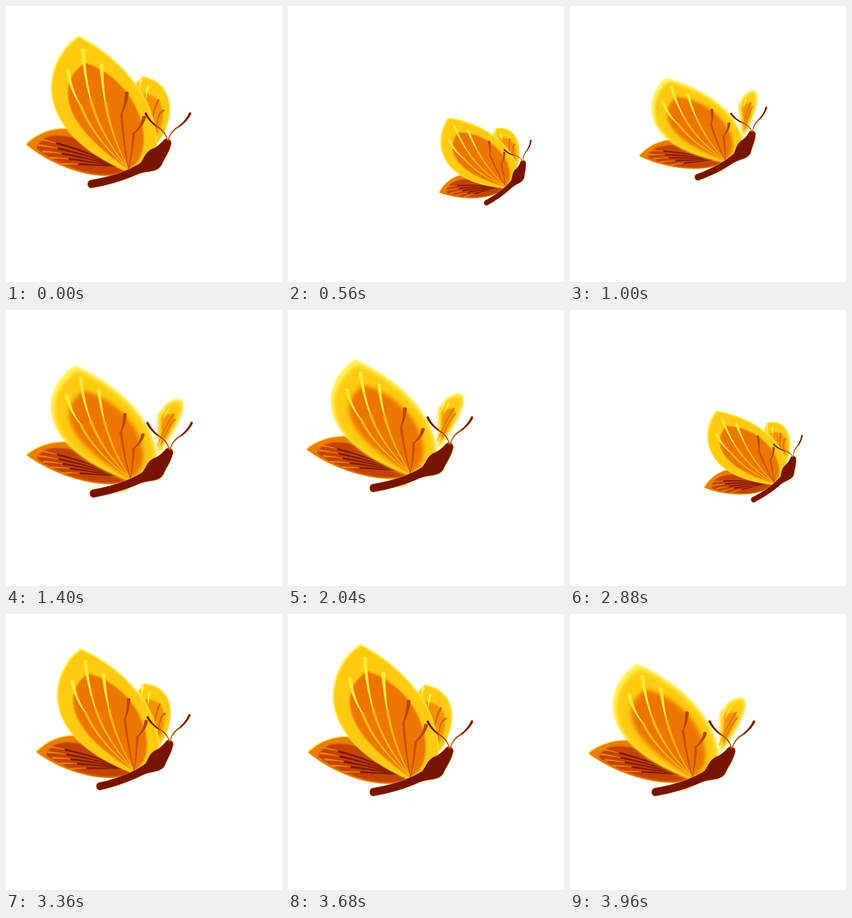
These frames come from a looping animation (480x480 px, 4000 ms). An HTML page with a canvas:

```html
<!DOCTYPE html>
<html lang="en">
<head>
<meta charset="utf-8">
<title>Butterfly</title>
<style>
html, body { margin: 0; width: 100%; height: 100%; overflow: hidden; background: #fff; }
canvas { display: block; width: 100vw; height: 100vh; }
</style>
</head>
<body>
<canvas id="stage" width="480" height="480"></canvas>
<script>
const ctx = document.getElementById('stage').getContext('2d');
const LOOP = 4000, STEP = 40;
const ROOT = [213, 285], FAR_ROOT = [262, 238];
const YELLOW = '#ffca10', PALE = '#fff45c', ORANGE = '#ed7600', BROWN = '#761400';

const WING = new Path2D('M126 51C72 85 25 205 210 288C240 275 262 258 262 238C262 165 205 92 126 51Z');
const WING_IN = new Path2D('M138 99C95 125 80 195 213 284C268 255 235 130 138 99Z');
const LOWER = new Path2D('M34 240C75 200 150 195 213 285C180 310 90 288 34 240Z');
const LOWER_IN = new Path2D('M53 248C62 212 130 215 213 285C165 308 90 278 53 248Z');
const FAR = new Path2D('M262 240C300 190 290 130 237 122L225 135Z');
const FAR_IN = new Path2D('M262 226C280 195 278 155 238 152Z');
const BODY = new Path2D(
  'M147 303C185 297 215 285 234 273C242 262 243 252 258 247C267 242 270 238 273 235' +
  'A7.5 7.5 0 0 1 286.5 242C282 258 275 265 270 277C262 290 245 286 230 292' +
  'C205 303 180 311 148 316.5A7 7 0 0 1 147 303Z');

const lerp = (a, b, k) => a + (b - a) * k;
const sin2 = a => Math.sin(a) ** 2;

// Out along a wide arc, back along a higher and slower one.
function flight(t) {
  const OUT = 580, BACK = 866;
  const rest = { x: 0, y: 0, scale: 1, deg: 0 };
  if (t < 0 || t > OUT + BACK) return rest;
  const away = t < OUT;
  const angle = Math.PI * (away ? t / OUT : 1 + (t - OUT) / BACK);
  const reach = sin2(angle / 2), side = sin2(angle);
  return {
    x: 166 * reach - side * (away ? 12 : 30),
    y: 29 * reach + side * (away ? 54 : -31),
    scale: 1 - .37 * reach,
    deg: -19 * reach + side * (away ? 2.8 : 0)
  };
}

function poseAt(t) {
  const pose = flight(t < 2000 ? t : t - 2135);
  const k = (t - 1300) / 500;
  const dip = k > 0 && k < 1 ? sin2(Math.PI * k) : 0;
  pose.x += 9 * dip;
  pose.y += 29 * dip;
  return pose;
}

// Curved stroke that thins from w0 to w1.
function taper(color, w0, w1, x0, y0, cx, cy, x1, y1) {
  const left = [], right = [];
  for (let i = 0; i <= 14; i++) {
    const k = i / 14, m = 1 - k;
    const x = m * m * x0 + 2 * m * k * cx + k * k * x1;
    const y = m * m * y0 + 2 * m * k * cy + k * k * y1;
    const dx = m * (cx - x0) + k * (x1 - cx), dy = m * (cy - y0) + k * (y1 - cy);
    const w = lerp(w0, w1, k) / 2 / Math.hypot(dx, dy);
    left.push([x - dy * w, y + dx * w]);
    right.unshift([x + dy * w, y - dx * w]);
  }
  ctx.fillStyle = color;
  ctx.beginPath();
  left.concat(right).forEach(p => ctx.lineTo(...p));
  ctx.fill();
  ctx.beginPath();
  ctx.arc(x0, y0, w0 / 2, 0, 7);
  ctx.fill();
}

function blur(size) {
  ctx.filter = size ? `blur(${size}px)` : 'none';
}

function fill(path, color, size = 0) {
  blur(size);
  ctx.fillStyle = color;
  ctx.fill(path);
  blur(0);
}

// Linear map about a root, blended from folded to open.
function fold([x, y], open, a, b, c, d, draw) {
  ctx.save();
  ctx.translate(x, y);
  ctx.transform(lerp(a, 1, open), lerp(c, 0, open), lerp(b, 0, open), lerp(d, 1, open), 0, 0);
  ctx.translate(-x, -y);
  draw();
  ctx.restore();
}

// Pale blade with a slightly smaller yellow one inside; the faster beat smears it.
function blade(root, path, open, s) {
  const size = lerp(.955, .985, open);
  fill(path, PALE, lerp(1.8, .8, open) * s);
  fold(root, 0, size, 0, 0, size, () => fill(path, YELLOW, lerp(3.5, 1.2, open) * s));
}

function farWing(open, s) {
  if (open < .5) {
    const hind = new Path2D();
    hind.ellipse(193, 299, 15, 8, 0, 0, 7);
    fill(hind, YELLOW, 2 * s);
  }
  fold(FAR_ROOT, open, .88, -.32, -.62, .87, () => {
    blade(FAR_ROOT, FAR, open, s);
    fill(FAR_IN, '#f29200', 1.5 * s);
    for (const x of [265, 274]) {
      taper('#d96500', 4, 1, x, 2 * x - 366, x - 11, 185, x - 13, 220);
    }
    for (const x of [235, 247]) {
      taper(PALE, 4, 1, x, x - 106, x - 3, x - 98, x - 3, x - 86);
    }
  });
}

function lowerWing(open, s) {
  fold(ROOT, open, 1.017, 0, .02, .88, () => {
    fill(LOWER, '#ffc21a', s);
    fold(ROOT, 0, .99, 0, 0, .98, () => fill(LOWER, '#e97d00', .5 * s));
    fill(LOWER_IN, '#c54300', s);
    for (let i = 0; i < 5; i++) {
      const x = 89 + 2.4 * i * i, y = 239 + 9 * i;
      taper('#ee8500', 3.5, 1, x - 34, y - 8 + 2 * i, x - 17, y - 5 + i, x, y);
      taper('#821b00', 4, 1.5, x, y, 145, lerp(y, 277, .4), 194, 279);
    }
  });
}

function wingVein(tx, ty, jx, jy, tip, inner, s) {
  blur(.7 * s);
  taper(tip, 6.5, 2, tx, ty, lerp(tx, jx, .2), lerp(ty, jy, .55), jx, jy);
  taper(inner, 5, 1.3, jx, jy, lerp(jx, ROOT[0], .25), lerp(jy, ROOT[1], .5), ROOT[0], 283);
  blur(0);
}

function bigWing(open, s) {
  fold(ROOT, open, .97, .05, 0, .85, () => {
    blade(ROOT, WING, open, s);
    const size = lerp(.975, 1, open);
    fold(ROOT, 0, size, 0, 0, size, () => fill(WING_IN, ORANGE, lerp(3.5, 1.3, open) * s));
    const light = ['#ffe83a', '#fbb50a', s], dark = ['#b94300', '#c95100', s];
    wingVein(108, 113, 130, 173, ...light);
    wingVein(134, 77, 148, 165, ...light);
    wingVein(166, 103, 173, 168, ...light);
    wingVein(210, 152, 201, 188, ...dark);
    wingVein(240, 194, 222, 222, ...dark);
  });
}

function body() {
  ctx.strokeStyle = '#f4a11c';
  ctx.lineWidth = 1.6;
  ctx.stroke(BODY);
  fill(BODY, BROWN);
  for (const side of [-1, 1]) {
    const x = d => 281.5 + side * d;
    const end = [x(38.5), 187, x(33), 199, x(20), 209];
    const stem = [x(20), 209, x(4), 218, x(.5), 234];
    taper('#e07b00', 4.4, 3, ...end);
    taper('#e89018', 3, 1.8, ...stem);
    taper(BROWN, 3.7, 2.2, ...end);
    taper('#a63c00', 2.1, .7, ...stem);
  }
}

function draw(t) {
  const { x, y, scale, deg } = poseAt(t);
  // One wing beat takes two steps.
  const open = t / STEP % 2 ? 0 : 1 - .25 * sin2(Math.PI * t / LOOP);
  ctx.setTransform(1, 0, 0, 1, 0, 0);
  ctx.fillStyle = '#fff';
  ctx.fillRect(0, 0, 480, 480);
  ctx.translate(ROOT[0] + x, ROOT[1] + y);
  ctx.rotate(deg * Math.PI / 180);
  ctx.scale(scale, scale);
  ctx.translate(-ROOT[0], -ROOT[1]);
  farWing(open, scale);
  lowerWing(open, scale);
  bigWing(open, scale);
  body();
}

function tick() {
  draw(Math.floor(performance.now() % LOOP / STEP) * STEP);
  requestAnimationFrame(tick);
}
tick();
</script>
</body>
</html>
```
